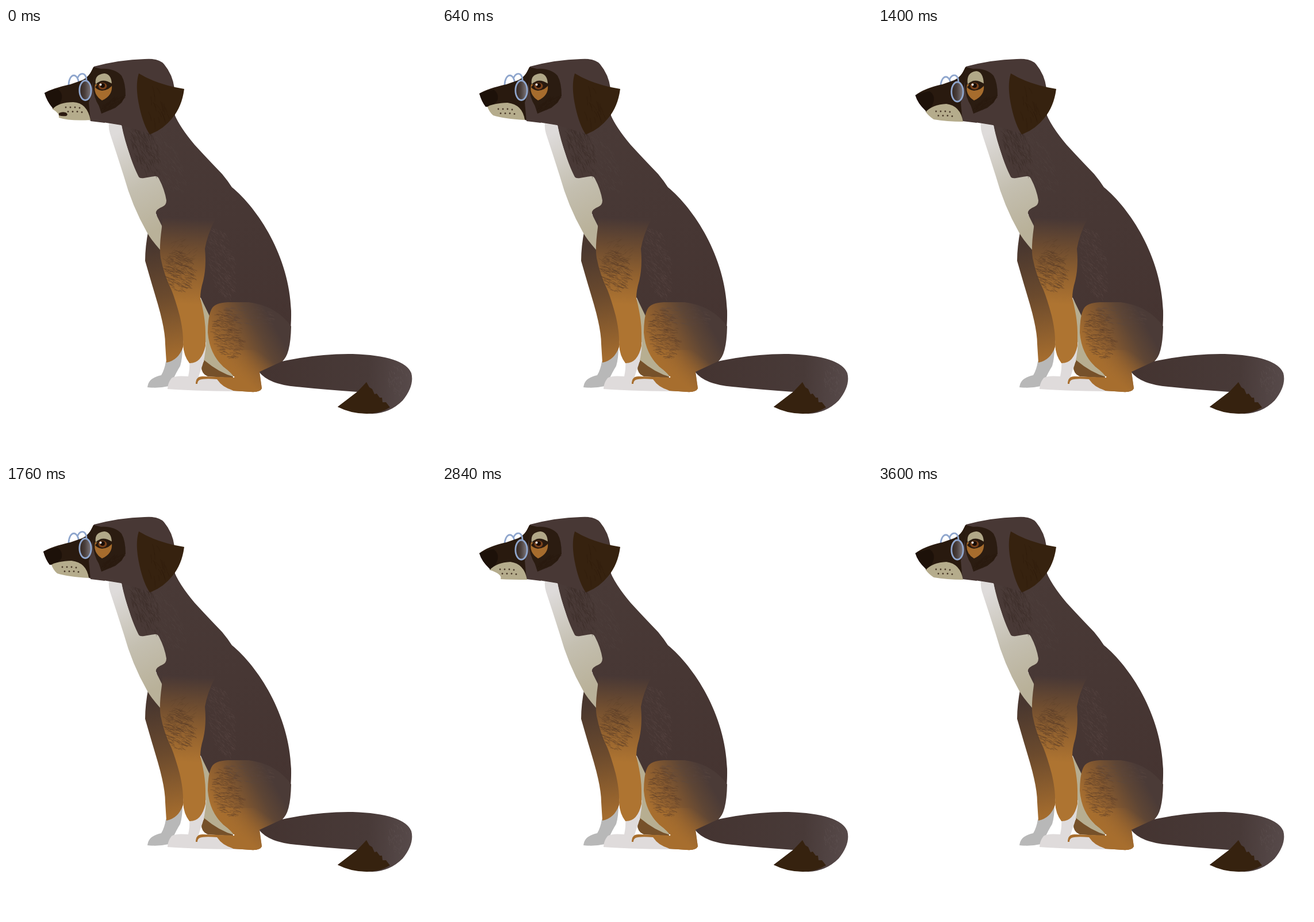
Write an HTML page that moves like this. It is 748 by 748 pixels and loops after 3640 ms.

```html
<!DOCTYPE html>
<html lang="en">
<head>
<meta charset="utf-8">
<title>Talking dog</title>
<style>
html, body { margin: 0; width: 100%; height: 100%; overflow: hidden; background: #fff; }
svg { display: block; width: 748px; height: 748px; }
.hatch { fill: none; stroke-linecap: round; }
.frame { stroke: #8fa6cd; stroke-width: 2.8; fill: none; }
</style>
</head>
<body>
<svg viewBox="0 0 748 748">
  <defs>
    <linearGradient id="coat" gradientUnits="userSpaceOnUse" x1="250" y1="160" x2="430" y2="560">
      <stop offset="0" stop-color="#493a37"/><stop offset="1" stop-color="#453431"/>
    </linearGradient>
    <linearGradient id="bib" gradientUnits="userSpaceOnUse" x1="180" y1="190" x2="265" y2="350">
      <stop offset="0" stop-color="#dedbda"/><stop offset=".55" stop-color="#c4bfb0"/><stop offset="1" stop-color="#b9b199"/>
    </linearGradient>
    <linearGradient id="farLeg" gradientUnits="userSpaceOnUse" x1="250" y1="380" x2="285" y2="575">
      <stop offset="0" stop-color="#49372f"/><stop offset=".45" stop-color="#6b4a2d"/><stop offset="1" stop-color="#a46c2e"/>
    </linearGradient>
    <linearGradient id="leg" gradientUnits="userSpaceOnUse" x1="316" y1="332" x2="308" y2="480">
      <stop offset="0" stop-color="#483835"/><stop offset=".35" stop-color="#6f4d30"/><stop offset=".7" stop-color="#96642f"/><stop offset="1" stop-color="#ae7431"/>
    </linearGradient>
    <linearGradient id="thigh" gradientUnits="userSpaceOnUse" x1="358" y1="565" x2="462" y2="508">
      <stop offset="0" stop-color="#ad7230"/><stop offset=".4" stop-color="#85592f"/><stop offset=".75" stop-color="#5d4535"/><stop offset="1" stop-color="#4b3b37"/>
    </linearGradient>
    <linearGradient id="hock" gradientUnits="userSpaceOnUse" x1="450" y1="570" x2="415" y2="615">
      <stop offset="0" stop-color="#a76e2e" stop-opacity="0"/><stop offset="1" stop-color="#a76e2e"/>
    </linearGradient>
    <linearGradient id="tail" gradientUnits="userSpaceOnUse" x1="450" y1="600" x2="706" y2="612">
      <stop offset="0" stop-color="#443431"/><stop offset=".7" stop-color="#483a38"/><stop offset="1" stop-color="#574a4a"/>
    </linearGradient>
    <linearGradient id="lens">
      <stop offset="0" stop-color="#33251e"/><stop offset=".45" stop-color="#4a3f3c"/><stop offset="1" stop-color="#817b80"/>
    </linearGradient>
  </defs>

  <!-- tail -->
  <path fill="url(#tail)" d="M440 598L470 582Q540 566 603 567Q692 570 705 600Q711 622 690 648Q668 670 637 671Q604 671 577 659L611 633Q552 629 505 624Q457 620 440 598Z"/>
  <path fill="#36220f" d="M577 659L611 633L627 616L632 625L637 628L641 637L645 636L650 643L654 643L655 651L661 651L668 660Q650 671 628 671Q600 671 577 659Z"/>

  <!-- far leg -->
  <path fill="#b8b8b8" d="M278 580L307 554Q307 575 303 588Q295 601 291 611Q289 621 283 623Q266 627 246 625Q247 617 252 612Q260 606 270 604Q276 594 278 580Z"/>
  <path fill="url(#farLeg)" d="M248 350Q242 380 242 405Q252 440 264 480Q277 525 277 550L279 582Q300 578 308 555L310 500L285 440L274 360Z"/>

  <!-- body -->
  <path fill="#b7ae91" d="M335 465L357 500L385 560L397 607Q365 600 344 580L340 525Z"/>
  <path fill="url(#coat)" d="M200 165L293 150Q302 172 328 203Q349 226 376 254Q386 266 393 277C438 314 493 397 496 492Q497 548 481 580L441 598L360 540L355 503L339 470L300 420L268 386L262 325L228 260L205 190Z"/>
  <path fill="url(#bib)" d="M179 166L201 169Q206 194 217 226Q225 248 231 259Q233 262 240 261L258 258Q263 257 266 262Q276 281 279 300Q279 308 272 311Q257 317 262 326L272 346L269 387Q252 368 245 355Q219 309 205 258Q193 220 181 184Q178 174 179 166Z"/>
  <g id="fur"></g>

  <!-- feet -->
  <path fill="#76512a" d="M345 578Q371 600 397 607L396 609L350 606Q339 600 340 588Z"/>
  <path fill="#dfdbdb" d="M319 580L348 546Q347 576 338 597L335 607Q365 605 395 620L416 632Q340 632 281 628Q281 618 288 609Q294 604 317 606Q320 592 319 580Z"/>
  <path fill="#fff" d="M341 597Q343 603 351 606L336 607Z"/>
  <path fill="#a86e2d" d="M330 619Q330 606 342 606L397 608L395 630Q377 626 367 611Q345 609 337 612Q333 614 333 619Z"/>

  <!-- near front leg -->
  <path fill="url(#leg)" d="M272 330L365 330Q350 360 346 384Q349 415 343 440Q338 456 338 470Q347 505 347 530L347 553Q340 584 319 583Q309 570 308 551Q309 529 302 500Q295 474 288 456Q275 430 269 400Q266 383 271 347Z"/>
  <g id="legFur"></g>

  <!-- hind leg -->
  <path fill="url(#thigh)" d="M357 490Q362 478 386 477L422 477Q470 483 496 519Q495 570 480 580L441 598L445 627Q442 634 426 633L396 631Q378 624 367 610L397 608Q394 601 378 589Q354 567 351 530Q351 503 357 490Z"/>
  <path fill="url(#hock)" d="M365 560L482 560Q489 570 480 580L441 598L445 627Q442 634 426 633L396 631Q378 624 367 610L397 608Q394 601 378 589Q369 580 363 570Z"/>
  <circle cx="396" cy="607" r="1.3" fill="#fff"/>
  <g id="hindFur"></g>

  <!-- head -->
  <g id="farLens">
    <ellipse class="frame" cx="118" cy="99" rx="9" ry="16.5"/>
  </g>
  <path fill="#483835" d="M150 73L153 67Q198 55 241 54Q266 52 275 63Q290 81 293 105L294 152L250 184L200 169L144 160L142 86Z"/>
  <path id="snout" fill="#291a0f"/>
  <path fill="#483835" d="M151 92Q147 122 144 130L147 162L172 165L162 136Z"/>
  <path fill="#2b1c11" d="M150 74C168 68 190 70 201 83Q208 95 208 118L201 130L190 139L166 149L162 136Q152 121 151 98Z"/>
  <g id="maskFur"></g>
  <path id="nose" fill="#1d1109"/>
  <path id="muzzle" fill="#b5ac8c"/>
  <path id="mouth" fill="#2b1a10" d="M92 148Q98 145 104 147Q109 150 105 153Q98 154 92 152Z"/>
  <g id="dots" fill="#4b3a2a"></g>

  <!-- eye -->
  <path fill="#a66c2d" d="M155 98Q151 116 167 126Q186 118 184 99Z"/>
  <path id="lid" fill="#b1a888"/>
  <path fill="#291a0f" d="M155 103Q163 91 174 93Q182 95 186 98Q180 108 167 109Q159 108 155 103Z"/>
  <ellipse cx="168" cy="101" rx="7.5" ry="6" fill="#7a421c"/>
  <circle cx="168" cy="100" r="4" fill="#190d07"/>
  <circle cx="164.500" cy="98.500" r="1.900" fill="#fff"/>

  <!-- ear -->
  <path fill="#36220f" d="M231 79Q262 98 310 106Q306 137 289 157Q273 177 250 185Q239 169 232 137Q224 101 231 79Z"/>
  <g id="earFur"></g>

  <g id="glasses">
    <path class="frame" d="M124 88Q128 78 135 80Q140 83 140 91"/>
    <ellipse class="frame" cx="138" cy="108.500" rx="10.200" ry="17" style="fill:url(#lens)"/>
  </g>
</svg>
<script>
const LOOP = 3640, STEP = 40, TWEEN = 80;
const $ = id => document.getElementById(id);
const NS = 'http://www.w3.org/2000/svg';
const add = (parent, tag, attrs) => {
  const el = parent.appendChild(document.createElementNS(NS, tag));
  for (const k in attrs) el.setAttribute(k, attrs[k]);
  return el;
};

let seed = 7;
const rnd = () => (seed = seed * 16807 % 2147483647) / 2147483647;

// Short slanted strokes scattered inside an ellipse
function hatch(id, cx, cy, rx, ry, count, angle, len, color, opacity, tilt = 0) {
  let d = '';
  for (let i = 0; i < count; i++) {
    const a = rnd() * Math.PI * 2, r = Math.sqrt(rnd());
    const u = Math.cos(a) * r * rx, v = Math.sin(a) * r * ry;
    const dir = angle + (rnd() - .5) * .6, l = len * (.5 + rnd());
    const dx = Math.cos(dir) * l, dy = Math.sin(dir) * l;
    const x = cx + u * Math.cos(tilt) - v * Math.sin(tilt) - dx / 2;
    const y = cy + u * Math.sin(tilt) + v * Math.cos(tilt) - dy / 2;
    const pts = [dx / 2 + 1, dy / 2 - 1, dx, dy].map(n => n.toFixed(1));
    d += `M${x.toFixed(1)} ${y.toFixed(1)}q${pts.join(' ')}`;
  }
  add($(id), 'path', { class: 'hatch', d, stroke: color, 'stroke-width': .8, opacity });
}
hatch('fur', 243, 212, 22, 48, 190, 1.1, 9, '#352724', .45, -.35);
hatch('fur', 282, 238, 24, 55, 120, .9, 7, '#5a4b47', .3, -.4);
hatch('fur', 376, 410, 22, 65, 220, .8, 6, '#5e4e4a', .4, -.15);
hatch('legFur', 302, 424, 25, 36, 170, .4, 10, '#553b28', .55, -.2);
hatch('legFur', 305, 395, 26, 28, 60, -.6, 7, '#553b28', .3);
hatch('hindFur', 386, 532, 25, 44, 190, .2, 8, '#553b28', .5, -.2);
hatch('hindFur', 425, 500, 45, 17, 110, .3, 6, '#5c4a42', .4, .15);
hatch('maskFur', 186, 131, 21, 8, 70, -.7, 6, '#291a0f', .8, -.5);
hatch('earFur', 265, 138, 20, 32, 18, 1.2, 14, '#2a190b', .45);
hatch('hindFur', 682, 612, 17, 28, 60, 1.2, 3, '#6a5d5c', .4);

for (let i = 0; i < 8; i++) {
  const row = i >> 2, col = i & 3;
  add($('dots'), 'circle', { cx: 98 + col * 8 + row * 4, cy: 141 + row * 7.5 + (col === 3 ? 1 : 0), r: 1.4 });
}

// tip: nose x, y and its lower corner; lip: muzzle outline; dot: whisker offset
const open = { tip: [67, 113, 81, 139], dot: [6, -3], drop: [0], talk: [1],
  lip: [81, 141, 92, 129, 117, 129, 141, 130, 147, 160, 110, 162, 92, 156, 94, 149] };
const shut = { tip: [65, 114, 76, 137], dot: [0, 0], drop: [0], talk: [0],
  lip: [79, 137, 89, 131, 114, 130, 140, 133, 144, 160, 108, 158, 89, 152, 82, 146] };
const low = { tip: [65, 117, 83, 144], dot: [3, 4], drop: [2.5], talk: [0],
  lip: [83, 146, 95, 133, 119, 132, 143, 135, 148, 163, 120, 163, 97, 159, 89, 154] };
const part = { ...low, lip: [83, 146, 95, 133, 119, 132, 143, 135, 148, 163, 120, 163, 102, 162, 105, 153] };

// start time, pose, top of the eyelid
const KEYS = [
  [0, open, 79], [320, shut, 79], [840, low, 75], [1400, shut, 79],
  [2040, open, 79], [2600, part, 79], [3120, low, 79]
];

const mix = (a, b, k) => a.map((v, i) => v + (b[i] - v) * k);
const ease = k => k * k * (3 - 2 * k);

function poseAt(t) {
  let i = KEYS.length - 1;
  while (KEYS[i][0] > t) i--;
  const [start, to, lid] = KEYS[i];
  const [, from, lid0] = KEYS[Math.max(0, i - 1)];
  const k = ease(Math.min(1, (t - start) / TWEEN));
  const pose = { lid: lid0 + (lid - lid0) * k };
  for (const key in to) pose[key] = mix(from[key], to[key], k);
  return pose;
}

function draw(t) {
  const { tip: [x, y, bx, by], lip, dot, drop: [drop], talk: [talk], lid } = poseAt(t);
  const [a, b, c, d, e, f, g, h, m, n, o, p, q, r, u, v] = lip;
  $('snout').setAttribute('d', `M152 68L147 78Q141 87 132 91L112 98Q80 105 ${x} ${y}Q${x + 4} ${y + 14} ${bx} ${by}L${a} ${b}L120 148L147 160L168 135L170 72Z`);
  $('nose').setAttribute('d', `M${x} ${y}Q80 ${y - 6} 90 ${y - 7}Q99 ${y} 97 ${y + 10}Q93 ${by - 2} ${bx} ${by}Q${x + 4} ${y + 14} ${x} ${y}Z`);
  $('muzzle').setAttribute('d', `M${a} ${b}Q${c} ${d} ${e} ${f}Q${g} ${h} ${m} ${n}Q${o} ${p} ${q} ${r}Q${u} ${v} ${a} ${b}Z`);
  $('mouth').setAttribute('opacity', talk);
  $('dots').setAttribute('transform', `translate(${dot})`);
  $('lid').setAttribute('d', `M156 98Q153 ${lid + 2} 171 ${lid}Q183 ${lid + 1} 184 97Q174 90 165 92Q160 94 156 98Z`);
  for (const id of ['glasses', 'farLens']) $(id).setAttribute('transform', `translate(0 ${drop})`);
}

const t0 = performance.now();
function tick(now) {
  const t = Math.max(0, now - t0) % LOOP;
  draw(Math.floor(t / STEP) * STEP);
  requestAnimationFrame(tick);
}
draw(0);
requestAnimationFrame(tick);
</script>
</body>
</html>
```
